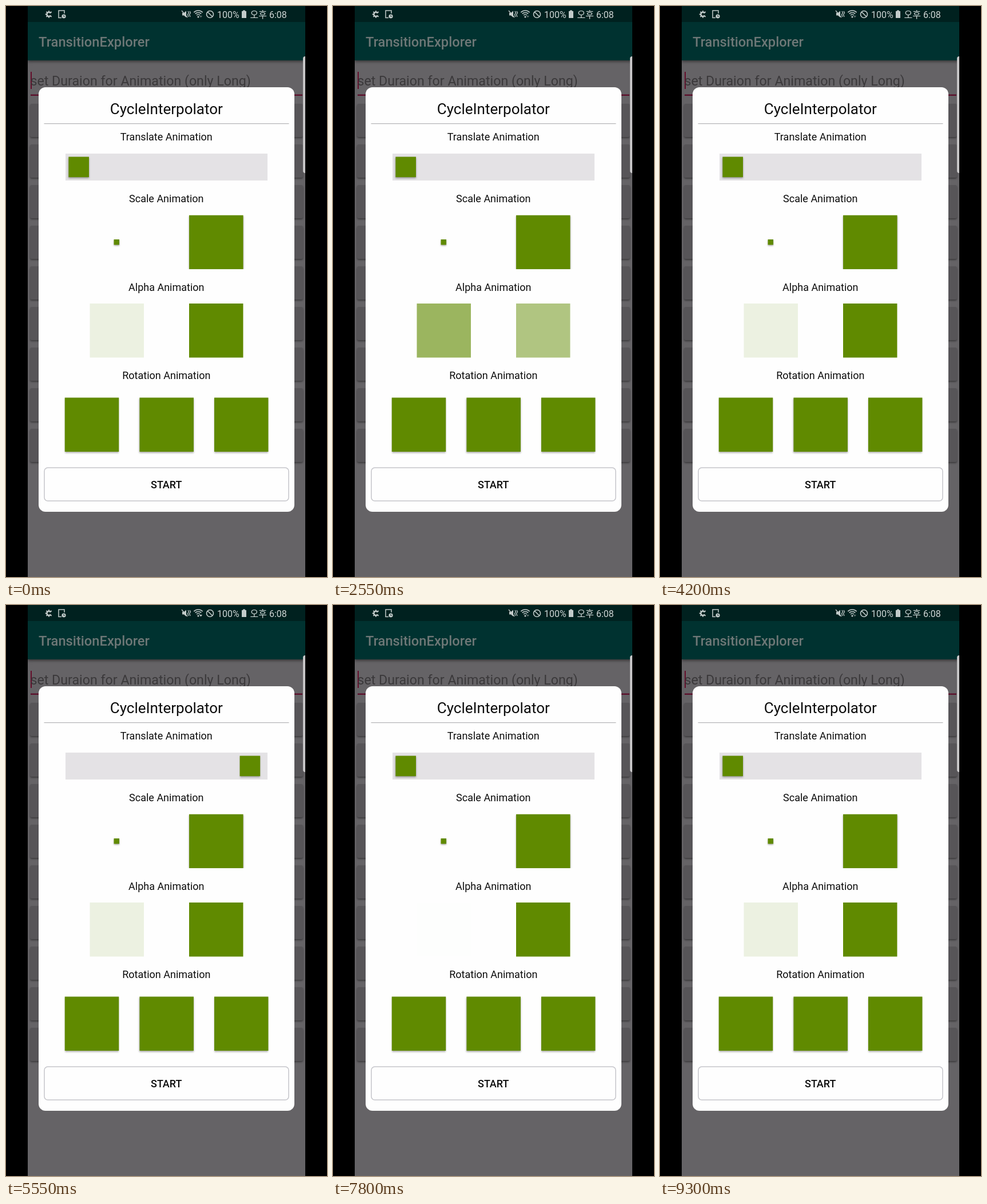
An HTML page with a canvas that plays this animation: 561x998 px, repeating every 9350 ms.

```html
<!DOCTYPE html>
<html lang="en">
<head>
<meta charset="utf-8">
<title>Cycle interpolator</title>
<style>
html, body { margin: 0; width: 100%; height: 100%; overflow: hidden; background: #000; }
canvas, svg { position: absolute; left: 0; top: 0; display: block; }
text { font-family: Roboto, "Noto Sans CJK KR", "Noto Sans CJK", sans-serif; }
.mid { text-anchor: middle; }
.label { font-size: 18px; fill: #0c0c0c; text-anchor: middle; }
.status { font-size: 16px; fill: #d0d6d5; }
.medium { font-weight: 500; }
</style>
</head>
<body>
<canvas id="stage" width="561" height="998"></canvas>
<svg width="561" height="998" viewBox="0 0 561 998">
  <text class="status" x="369" y="20.5">100%</text>
  <text class="status" x="426.5" y="20.5">오후 6:08</text>
  <text class="medium" x="57" y="70.5" font-size="23.7" fill="#6d7776">TransitionExplorer</text>
  <g id="hint"><text x="42.5" y="138.5" font-size="23.2" fill="#3b393b" clip-path="url(#above)">set Duraion for Animation (only Long)</text></g>
  <clipPath id="above"><rect x="38" y="95" width="485" height="47"/></clipPath>
  <text class="mid" x="280.3" y="189" font-size="26" fill="#0c0c0c">CycleInterpolator</text>
  <text class="label" x="280.3" y="234.5">Translate Animation</text>
  <text class="label" x="280.3" y="342.5">Scale Animation</text>
  <text class="label" x="280.3" y="497.5">Alpha Animation</text>
  <text class="label" x="280.3" y="652">Rotation Animation</text>
  <text class="label medium" x="280.3" y="842.5">START</text>
</svg>
<script>
const ctx = document.getElementById('stage').getContext('2d');
const LOOP = 9350, STEP = 50;
const GREEN = '#608a00', HALF = 47.25, CAMERA = 194;

// [start, duration] of each run
const RUNS = {
  move: [[94, 1070], [5244, 1070]],
  scale: [[1147, 1000], [6315, 980]],
  alpha: [[2147, 1000], [7280, 1000]],
  spin: [[3142, 1013], [8288, 1000]]
};

function cycle(name, t) {
  const run = RUNS[name].find(([start, span]) => t > start && t < start + span);
  return run ? Math.sin(2 * Math.PI * (t - run[0]) / run[1]) : 0;
}

function box(x, y, w, h, color) {
  ctx.fillStyle = color;
  ctx.fillRect(x, y, w, h);
}

function round(x, y, w, h, r) {
  ctx.beginPath();
  ctx.roundRect(x, y, w, h, r);
}

function clipped(x, y, w, h, draw) {
  ctx.save();
  ctx.beginPath();
  ctx.rect(x, y, w, h);
  ctx.clip();
  draw();
  ctx.restore();
}

function shadowed(color, blur, dy, draw) {
  ctx.save();
  ctx.shadowColor = color;
  ctx.shadowBlur = blur;
  ctx.shadowOffsetY = dy;
  draw();
  ctx.restore();
}

function line(width, color, draw) {
  ctx.lineWidth = width;
  ctx.strokeStyle = color;
  ctx.beginPath();
  draw();
  ctx.stroke();
}

function square(cx, cy, w, h = w) {
  shadowed('rgba(0,0,0,.35)', 3, 1.5, () => box(cx - w / 2, cy - h / 2, w, h, GREEN));
}

function statusIcons(busy) {
  const ink = '#c3cbca', arc = (x, y, r, a = 0, b = 7) => ctx.arc(x, y, r, a, b);
  // gear
  line(2.4, ink, () => arc(75, 14.5, 3.6, .6, 5.7));
  for (let i = 1; i < 8; i++) {
    const a = i * Math.PI / 4, c = Math.cos(a), s = Math.sin(a);
    line(2, ink, () => { ctx.moveTo(75 + 4 * c, 14.5 + 4 * s); ctx.lineTo(75 + 6.3 * c, 14.5 + 6.3 * s); });
  }
  // page with clock
  line(1.5, ink, () => {
    ctx.moveTo(97, 20.5); ctx.lineTo(92, 20.5); ctx.lineTo(92, 8); ctx.lineTo(102, 8); ctx.lineTo(102, 13);
  });
  ctx.fillStyle = ink;
  ctx.beginPath();
  arc(101, 18, 3.6);
  ctx.fill();
  line(1, '#00211f', () => { ctx.moveTo(101, 16); ctx.lineTo(101, 18.3); ctx.lineTo(102.6, 18.3); });
  // muted speaker
  ctx.fillStyle = ink;
  ctx.beginPath();
  [[308, 12], [311, 12], [315, 8.5], [315, 20], [311, 16.5], [308, 16.5]].forEach(p => ctx.lineTo(...p));
  ctx.fill();
  line(1.3, ink, () => { ctx.moveTo(307, 8); ctx.lineTo(317, 20); });
  for (const x of [318, 321]) line(1.3, ink, () => {
    ctx.moveTo(x, 9); ctx.lineTo(x + 1.5, 12); ctx.lineTo(x - .5, 15); ctx.lineTo(x + 1, 19);
  });
  // wifi
  for (const r of [4, 7.5, 11]) line(1.6, ink, () => arc(336, 19, r, -2.35, -.8));
  ctx.fillStyle = ink;
  ctx.beginPath();
  arc(336, 19, 1.6);
  ctx.fill();
  ctx.fillStyle = busy ? ink : '#5f6e6c';
  ctx.beginPath();
  [[338, 17], [343, 17], [340.5, 20.5]].forEach(p => ctx.lineTo(...p));
  ctx.fill();
  // blocked sign, battery
  line(1.6, ink, () => { arc(356.5, 14.5, 6); ctx.moveTo(352.3, 10.3); ctx.lineTo(360.7, 18.7); });
  box(414, 7.5, 4, 2, ink);
  box(412, 9, 8, 12, ink);
}

function backdrop(t) {
  box(0, 0, 561, 998, '#000');
  box(38, 0, 485, 998, '#656366');
  shadowed('rgba(0,0,0,.5)', 5, 2, () => box(38, 28, 485, 67, '#003230'));
  box(38, 0, 485, 28, '#00211f');
  box(0, 0, 38, 110, '#000');
  box(523, 0, 38, 110, '#000');
  statusIcons(t >= 4750 && t < 6300);
  box(43, 115, 2, 30, '#640d2a');
  box(43, 154.5, 475, 2.5, '#5c112c');
  for (let i = 0; i < 9; i++) {
    shadowed('rgba(0,0,0,.4)', 3, 2, () => {
      ctx.fillStyle = '#575558';
      round(42, 171 + i * 71, 477, 58, 3);
      ctx.fill();
    });
  }
  ctx.fillStyle = '#c6c5c6';
  round(519, 88, 4, 204, [4, 0, 0, 4]);
  ctx.fill();
}

function dialog() {
  ctx.fillStyle = '#fefefe';
  round(57, 142, 447, 742, 12);
  ctx.fill();
  box(66.5, 205, 428, 1.2, '#b4b4b6');
  box(104, 258, 353, 47, '#e4e2e5');
  ctx.lineWidth = 1.5;
  ctx.strokeStyle = '#c5c5ca';
  round(67, 807, 427, 58, 6);
  ctx.stroke();
}

function project(cx, cy, x, y, ax, ay) {
  const x1 = x * Math.cos(ay), z1 = -x * Math.sin(ay);
  const y1 = y * Math.cos(ax) - z1 * Math.sin(ax);
  const z = y * Math.sin(ax) + z1 * Math.cos(ax);
  const k = 1 / (1 - z / CAMERA);
  return { x: cx + x1 * k, y: cy + y1 * k, z };
}

function polygon(points) {
  ctx.beginPath();
  points.forEach(p => ctx.lineTo(p.x, p.y));
  ctx.closePath();
  ctx.fill();
}

function tilted(cx, cy, ax, ay) {
  const corners = [[-1, -1], [1, -1], [1, 1], [-1, 1]]
    .map(([x, y]) => project(cx, cy, x * HALF, y * HALF, ax, ay));
  const lift = Math.max(...corners.map(p => p.z));
  if (lift < .5) return square(cx, cy, 2 * HALF);

  // nearer corners throw their shadow further from the light at the top
  const both = ax && ay, far = 2000;
  const cast = corners.map(p => {
    const k = .0012 * (both ? lift : Math.max(p.z, 0));
    return { x: p.x + (p.x - 280) * k - far, y: p.y + p.y * k };
  });
  ctx.save();
  ctx.shadowColor = 'rgba(0,0,0,.24)';
  ctx.shadowBlur = both ? Math.min(lift, 32) : 4;
  ctx.shadowOffsetX = far;
  ctx.fillStyle = '#000';
  polygon(cast);
  ctx.restore();
  ctx.fillStyle = GREEN;
  polygon(corners);
}

function draw(t) {
  backdrop(t);
  dialog();

  const afterMove = RUNS.scale.some(([s]) => t >= s && t < s + 200);
  const shift = afterMove ? 0 : 307 * cycle('move', t);
  clipped(104, 258, 353, 47, () => square(127.2 + shift, 281.4, 35.6));

  const grow = .9 * cycle('scale', t);
  clipped(67, 365.5, 427, 94.5, () => {
    square(193.3, 412.7, 2 * HALF * Math.abs(.1 + grow));
    square(367.3, 412.7, 2 * HALF * (1 - grow));
  });

  const fade = .885 * cycle('alpha', t);
  [[146.5, .115 + fade], [320, 1 - fade]].forEach(([x, a]) => {
    ctx.globalAlpha = Math.min(1, Math.max(0, a));
    box(x, 520, 94.5, 94.5, GREEN);
  });
  ctx.globalAlpha = 1;

  const turn = 2 * Math.PI * cycle('spin', t);
  clipped(67, 674, 427, 114.5, () => {
    tilted(150, 731.8, turn, 0);
    tilted(280.7, 731.8, 0, turn);
    tilted(411.2, 731.8, turn, -turn);
  });
}

function frame() {
  const t = performance.now() % LOOP;
  draw(Math.floor(t / STEP) * STEP);
  requestAnimationFrame(frame);
}
frame();
</script>
</body>
</html>
```
